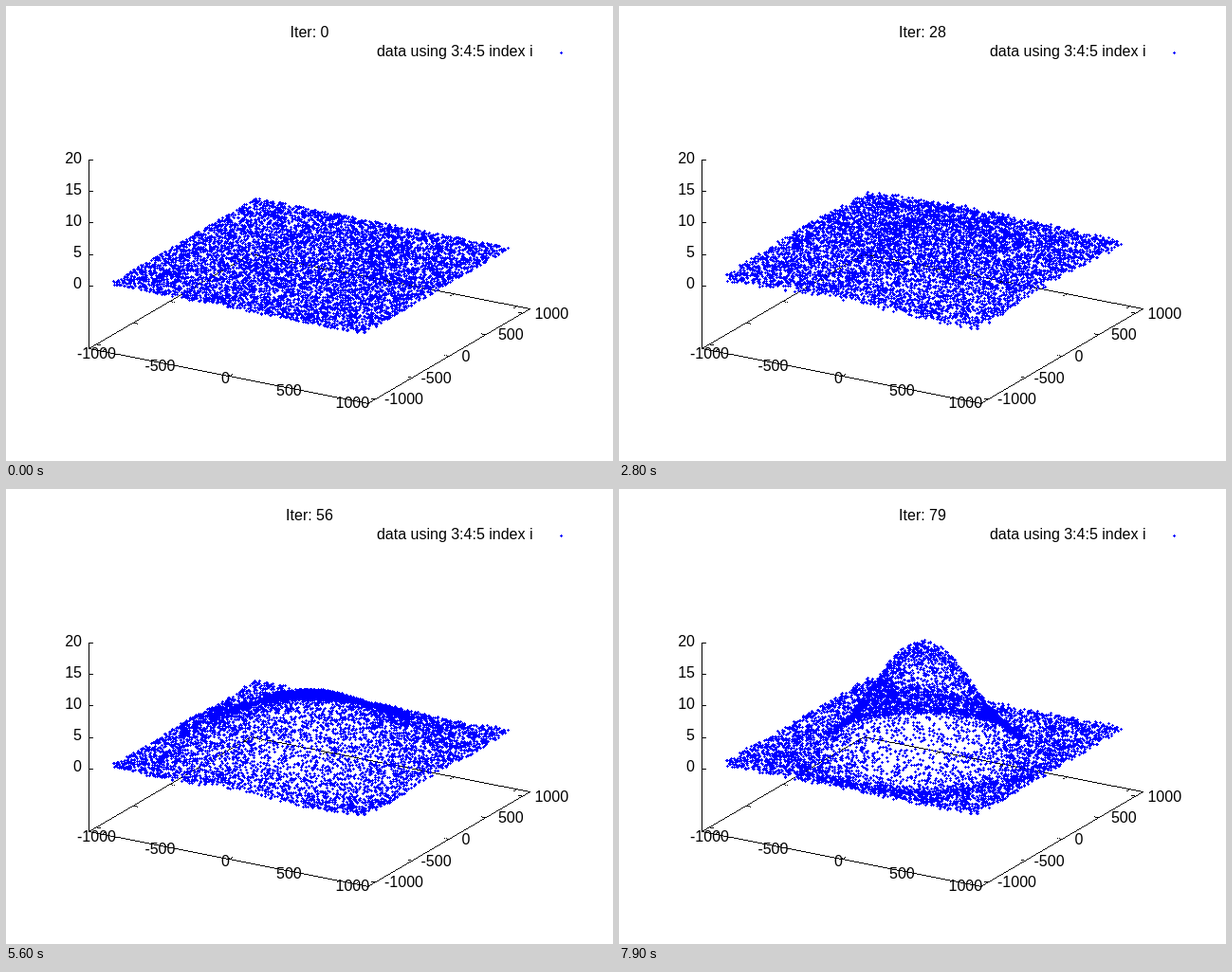
Recreate the animation shown at these times as an HTML page with a canvas. Size 640 by 480 pixels, loop 8000 ms.

```html
<!DOCTYPE html>
<html lang="en">
<head>
<meta charset="utf-8">
<title>Surface plot</title>
<style>
html, body { margin: 0; width: 100%; height: 100%; overflow: hidden; background: #fff; }
canvas { display: block; }
</style>
</head>
<body>
<canvas id="stage" width="640" height="480"></canvas>
<script>
const ctx = document.getElementById('stage').getContext('2d');
const STEP = 100, STEPS = 80, COUNT = 8000, HALF = 1000;
const TICKS = [-1000, -500, 0, 500, 1000];

// Key values over the iterations: [iteration, peak height in px, bump radius]
const KEYS = [
  [0, 0, 2200], [8, 1.5, 2150], [20, 8, 2000], [36, 20, 1500],
  [47, 32, 1300], [64, 71, 920], [79, 100, 760]
];

let seed = 20731;
function random() {
  seed = (seed + 0x6D2B79F5) | 0;
  let n = Math.imul(seed ^ (seed >>> 15), 1 | seed);
  n = (n + Math.imul(n ^ (n >>> 7), 61 | n)) ^ n;
  return ((n ^ (n >>> 14)) >>> 0) / 4294967296;
}

const points = Array.from({ length: COUNT }, () => ({
  x: (random() * 2 - 1) * HALF,
  y: (random() * 2 - 1) * HALF,
  lift: random()
}));

// Data coordinates to the screen; z is in pixels above the axis floor
function project(x, y, z = 0) {
  const a = (x + 1100) / 2200, b = (y + 1100) / 2200;
  return [87.5 + 294.5 * a + 170.5 * b, 361 + 58 * a - 100 * b - z];
}

function line([x0, y0], [x1, y1]) {
  const n = Math.max(1, Math.round(Math.max(Math.abs(x1 - x0), Math.abs(y1 - y0))));
  for (let i = 0; i <= n; i++) {
    const k = i / n;
    ctx.fillRect(Math.floor(x0 + (x1 - x0) * k), Math.round(y0 + (y1 - y0) * k), 1, 1);
  }
}

function plus(x, y) {
  ctx.fillRect(x - 1, y, 3, 1);
  ctx.fillRect(x, y - 1, 1, 3);
}

function text(value, x, y, align) {
  ctx.textAlign = align;
  ctx.fillText(value, x, Math.round(y));
}

function drawAxes() {
  const left = project(-1100, -1100), front = project(1100, -1100);
  const right = project(1100, 1100), back = project(-1100, 1100);
  line(left, front);
  line(front, right);
  line(right, back);
  line(back, left);
  line([87, 162], left);

  TICKS.forEach((v, i) => {
    line(project(v, -1100), project(v, -1055));
    line(project(v, 1100), project(v, 1055));
    line(project(1100, v), project(1068, v));
    line(project(-1100, v), project(-1068, v));

    // A space takes the place of the sign
    const label = (v < 0 ? '' : ' ') + v;
    text(label, 95.5 + 66.9 * i, 372 + 13 * i, 'center');
    text(label, 399 + 38.5 * i, 420.4 - 22.7 * i, 'left');

    const y = 295 - 33.3 * i;
    line([87, y], [91, y]);
    text(5 * i, 80, 298 - 33 * i, 'right');
  });
}

function bumpAt(iter) {
  const i = KEYS.findIndex(key => key[0] >= iter);
  if (i < 1) return KEYS[0].slice(1);
  const from = KEYS[i - 1], to = KEYS[i];
  const k = (iter - from[0]) / (to[0] - from[0]);
  return [1, 2].map(j => from[j] + (to[j] - from[j]) * k);
}

function drawPoints(iter) {
  const [height, radius] = bumpAt(iter);
  const spread = 0.3 + 7 * Math.sin(Math.PI * iter / 47) ** 2;
  for (const p of points) {
    const r = Math.hypot(p.x, p.y) / radius;
    const bump = height * Math.cos(Math.min(1, r) * Math.PI / 2) ** 2;
    const trough = 0.04 * height * Math.exp(-(((r - 1.05) / 0.15) ** 2));
    const noise = spread * (1 + bump / 60) * (0.15 + 0.85 * p.lift);
    const [x, y] = project(p.x, p.y, 66 + bump - trough + noise);
    plus(Math.round(x), Math.round(y));
  }
}

function draw(iter) {
  ctx.fillStyle = '#fff';
  ctx.fillRect(0, 0, 640, 480);
  ctx.fillStyle = '#000';
  ctx.font = '16px "Liberation Sans", Arial, sans-serif';
  drawAxes();
  text('Iter: ' + iter, 320, 33, 'center');
  text('data using 3:4:5 index i', 555.5, 53, 'right');
  ctx.fillStyle = '#00f';
  plus(585, 49);
  drawPoints(iter);
}

const start = performance.now();
let shown = -1;
function tick() {
  const iter = Math.floor((performance.now() - start) / STEP) % STEPS;
  if (iter !== shown) draw(shown = iter);
  requestAnimationFrame(tick);
}
tick();
</script>
</body>
</html>
```
